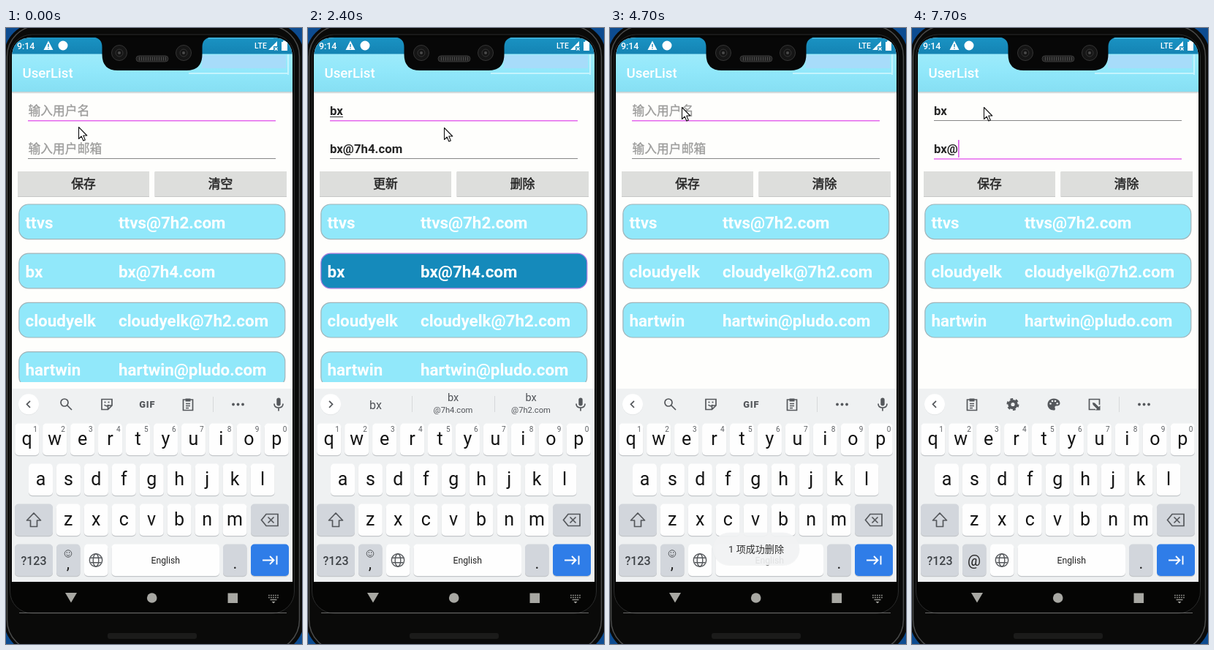
Write an HTML page that moves like this. It is 405 px wide and 842 px high and loops after 8000 ms.

```html
<!DOCTYPE html>
<html lang="zh-CN">
<head>
<meta charset="utf-8">
<title>UserList</title>
<style>
html, body { margin: 0; width: 100%; height: 100%; overflow: hidden; background: #050505; }
svg { display: block; width: 405px; height: 842px; }
text { font-family: Roboto, "Noto Sans CJK SC", "Noto Sans CJK", sans-serif; }
.hint { font-size: 16.8px; fill: #9c9c9b; stroke: #9c9c9b; stroke-width: .3; }
.value { font-size: 16.8px; font-weight: 700; fill: #262626; }
.btn { font-size: 16.8px; fill: #252525; stroke: #252525; stroke-width: .5; text-anchor: middle; }
.row { font-size: 22.4px; font-weight: 700; fill: #fff; }
.mid { text-anchor: middle; }
.letter { font-size: 25px; fill: #151515; text-anchor: middle; }
.caps .letter { text-transform: uppercase; }
.num { font-size: 10px; fill: #5c5f63; text-anchor: middle; }
.icon { fill: none; stroke: #55585c; stroke-width: 1.7; }
.thin { stroke-width: 1; }
.solid { fill: #55585c; stroke: none; }
.caret { fill: #dd62ea; }
.focus { stroke: #e467ee; stroke-width: 1.5; }
.blur { stroke: #878787; }
</style>
</head>
<body>
<svg viewBox="0 0 405 842" xmlns="http://www.w3.org/2000/svg">
  <defs>
    <linearGradient id="bar" x2="0" y2="1">
      <stop offset="0" stop-color="#9debfb"/><stop offset=".5" stop-color="#90e7fa"/><stop offset="1" stop-color="#86dff3"/>
    </linearGradient>
    <linearGradient id="status" x2="0" y2="1">
      <stop offset="0" stop-color="#1a93c3"/><stop offset="1" stop-color="#1483b3"/>
    </linearGradient>
    <linearGradient id="shade" x2="0" y2="1">
      <stop offset="0" stop-color="#b9c6c9"/><stop offset="1" stop-color="#fefefc"/>
    </linearGradient>
    <clipPath id="screen"><path d="M8 757V41Q8 13 36 13H364Q392 13 392 41V757Z"/></clipPath>
    <clipPath id="list"><path d="M8 232H392V484H8Z"/></clipPath>
    <g id="clip" class="icon">
      <path d="M-6.5 -6.5H6.5V8H-6.5Z M-3 -1H3 M-3 2H3 M-3 5H1"/>
      <path class="solid" d="M-3.5 -8H3.5V-4H-3.5Z"/>
    </g>
  </defs>

  <!-- phone body -->
  <path fill="#0d4c91" d="M0 0H405V842H0Z"/>
  <rect x="-3" y="-7" width="411" height="862" rx="46" fill="#0a0a09"/>
  <rect x="1.5" y="-3" width="400" height="854" rx="42" fill="none" stroke="#4a4b4b" stroke-width="1.5"/>
  <rect x="5.5" y="9" width="389" height="791" rx="30" fill="#050504" stroke="#2a2b2b"/>
  <path d="M18 799.5H384" stroke="#686867"/>
  <rect x="139" y="827" width="122" height="8" rx="3" fill="#1b1b1a"/>

  <g clip-path="url(#screen)">
    <path fill="#fefefc" d="M8 13H392V757H8Z"/>
    <path fill="url(#status)" d="M8 13H392V36H8Z"/>
    <path fill="url(#bar)" d="M8 35.5H392V87H8Z"/>
    <path fill="url(#shade)" d="M8 87H392V90H8Z"/>
    <path fill="#a7dcfa" d="M268 37H383V55H268Z"/>
    <path d="M276 14H366" stroke="#45b6de" stroke-width="1.5"/>
    <path d="M250 62H386M386 36V64" stroke="#c4f4fd" stroke-width="2" fill="none"/>
    <text x="15" y="29" font-size="12.4" font-weight="500" fill="#fff">9:14</text>
    <path fill="#fff" d="M58 17.5L64.5 30H51.5Z"/>
    <path stroke="#1787b8" stroke-width="1.4" d="M58 22V26M58 27.2V28.6"/>
    <circle cx="78" cy="24" r="6.5" fill="#fff"/>
    <text x="340" y="28" font-size="10.4" font-weight="500" fill="#fff">LTE</text>
    <path fill="#fff" d="M359 30L371 18V25H366V30Z"/>
    <path stroke="#fff" stroke-width="1.3" d="M367.5 26.5L371.5 30.5M371.5 26.5L367.5 30.5"/>
    <path fill="#fff" d="M377 19H379V17.5H383V19H385V31H377Z"/>
    <text x="22.5" y="68" font-size="18.7" font-weight="500" fill="#fff">UserList</text>

    <!-- name field -->
    <text class="hint" x="30.5" y="119.3" data-on="0-1400 3100-5200">输入用户名</text>
    <text class="value" x="30" y="119.3" data-on="1400-3100 5200-8000">bx</text>
    <path d="M30 121.5H48" stroke="#333" data-on="1500-3100 5400-5900"/>
    <path class="focus" d="M30 126.7H369" data-on="0-5900"/>
    <path class="blur" d="M30 126.5H369" data-on="5900-8000"/>
    <path class="caret" d="M30 102H31.7V125H30Z" data-on="200-700 1200-1900 2500-3000 3100-3700 4200-4700"/>
    <path class="caret" d="M48 102H49.7V125H48Z" data-on="5200-5900"/>

    <!-- mail field -->
    <text class="hint" x="30.5" y="170.8" data-on="0-1400 3100-6700">输入用户邮箱</text>
    <text class="value" x="30" y="171" data-on="1400-3100">bx@7h4.com</text>
    <text class="value" x="30" y="171" data-on="6700-6900">b</text>
    <text class="value" x="30" y="171" data-on="6900-7600">bx</text>
    <text class="value" x="30" y="171" data-on="7600-8000">bx@</text>
    <path d="M30 173.5H48" stroke="#333" data-on="6900-7600"/>
    <path class="blur" d="M30 178.5H369" data-on="0-5900"/>
    <path class="focus" d="M30 178.9H369" data-on="5900-8000"/>
    <path class="caret" d="M30 153H31.7V177H30Z" data-on="5900-6400"/>
    <path class="caret" d="M39 153H40.7V177H39Z" data-on="6700-6900"/>
    <path class="caret" d="M48 153H49.7V177H48Z" data-on="6900-7400"/>
    <path class="caret" d="M63 153H64.7V177H63Z" data-on="7600-8000"/>

    <!-- buttons -->
    <path fill="#c6c7c6" d="M16 197H196V231H16ZM203.5 197H384V231H203.5Z"/>
    <path fill="#dddedc" d="M16 196H196V230H16ZM203.5 196H384V230H203.5Z"/>
    <g id="press">
      <rect x="203" y="198" width="181.5" height="35" rx="2" fill="#d9d9d8"/>
      <rect x="203.5" y="196" width="180.5" height="34.5" rx="1" fill="#c2c2c1"/>
    </g>
    <text class="btn" x="106" y="219.3" data-on="0-1400 3100-8000">保存</text>
    <text class="btn" x="106" y="219.3" data-on="1400-3100">更新</text>
    <text class="btn" x="293.5" y="219.3" data-on="0-1400">清空</text>
    <text class="btn" x="293.5" y="219.3" data-on="1400-3100">删除</text>
    <text class="btn" x="293.5" y="219.3" data-on="3100-8000">清除</text>

    <g id="rows" clip-path="url(#list)"></g>

    <!-- keyboard -->
    <path fill="#eff1f2" d="M8 493H392V757H8Z"/>
    <circle cx="31" cy="515" r="14" fill="#dfe1e3"/>
    <circle cx="31" cy="514.3" r="14" fill="#fff"/>
    <g data-on="0-1500 3400-5400 6400-6900 7600-8000">
      <path class="icon" d="M33 509.8L28.5 514.3L33 518.8"/>
      <path stroke="#d6d8da" d="M283.5 504V525"/>
      <g class="solid"><circle cx="311" cy="514.5" r="1.9"/><circle cx="317.5" cy="514.5" r="1.9"/><circle cx="324" cy="514.5" r="1.9"/></g>
    </g>
    <g data-on="0-1500 3400-5400">
      <g class="icon">
        <circle cx="80" cy="512" r="5"/><path d="M83.5 515.5L90 522"/>
        <path d="M131 507.5H145V516L139.5 521.5H131ZM145 516H139.5V521.5M134.5 515Q137.5 518 140.5 515"/>
      </g>
      <g class="solid"><circle cx="135.5" cy="511.5" r="1.1"/><circle cx="140.5" cy="511.5" r="1.1"/></g>
      <text class="mid" x="193.3" y="518.5" font-size="12.8" font-weight="900" letter-spacing=".8" fill="#55585c">GIF</text>
      <use href="#clip" x="249" y="514.5"/>
    </g>
    <g data-on="6400-6900 7600-8000">
      <use href="#clip" x="82" y="514.5"/>
      <circle class="icon" cx="138" cy="514.5" r="4.6" style="stroke-width:4"/>
      <circle class="icon" cx="138" cy="514.5" r="7.3" style="stroke-width:2.4" stroke-dasharray="3.82"/>
      <path class="solid" d="M194 506.5C189 506.5 185.5 510 185.5 514.5S189 522.5 194 522.5C196.5 522.5 196 520 195.5 519C195 517.5 196 516.5 198 516.5C201 516.5 202.5 515 202.5 513C202.5 509 198.5 506.5 194 506.5Z"/>
      <g fill="#eff1f2"><circle cx="189.5" cy="513.5" r="1.3"/><circle cx="192" cy="510" r="1.3"/><circle cx="196" cy="510" r="1.3"/><circle cx="198.8" cy="513.2" r="1.3"/></g>
      <path class="icon" d="M251 521.5H242.5V507.5H256.5V515"/>
      <path class="solid" d="M247 512L250 512.5L255.5 518L257.5 516V522.5H251L253 520.5L247.5 515Z"/>
    </g>
    <g data-on="1500-3400 5400-6400 6900-7600">
      <path class="icon" d="M29 509.8L33.5 514.3L29 518.8"/>
      <path stroke="#d6d8da" d="M142.5 503V525M255.5 503V525"/>
      <g class="mid" fill="#505358">
        <text x="92.5" y="520.5" font-size="16">bx</text>
        <text x="198.5" y="509.8" font-size="14.5">bx</text>
        <text x="198.5" y="525.5" font-size="11.2">@7h4.com</text>
        <text x="305" y="509.8" font-size="14.5">bx</text>
        <text x="305" y="525.5" font-size="11.2">@7h2.com</text>
      </g>
    </g>
    <g data-on="0-6400">
      <rect class="solid" x="370.3" y="505.5" width="5.4" height="11" rx="2.7"/>
      <path class="icon" d="M367 513.5Q367 519 373 519T379 513.5M373 519V523.5"/>
    </g>
    <g id="keys"></g>
    <g class="icon">
      <path id="shift" d="M38 663L47.5 673H42.5V681.5H33.5V673H28.5Z" stroke-linejoin="round"/>
      <path d="M356 664.5H372V680.5H356L349.5 672.5ZM358.5 668.5L366.5 676.5M366.5 668.5L358.5 676.5"/>
      <g style="stroke-width:1.4">
        <circle cx="123" cy="727.5" r="8.7"/>
        <ellipse cx="123" cy="727.5" rx="3.8" ry="8.7"/>
        <path d="M115.5 724.3H130.5M115.5 730.7H130.5"/>
      </g>
    </g>
    <text class="mid" x="38" y="733.5" font-size="16" font-weight="500" fill="#3f4347">?123</text>
    <g data-on="0-6400">
      <text class="mid" x="85" y="738.5" font-size="22" fill="#222">,</text>
      <circle class="icon thin" cx="85" cy="718.5" r="4.8"/>
      <path class="icon thin" d="M82.5 720Q85 722.8 87.5 720M83.3 716V718M86.7 716V718"/>
    </g>
    <text class="mid" x="85" y="734.5" font-size="20" fill="#222" data-on="6400-8000">@</text>
    <text class="mid" x="218.3" y="732" font-size="12.2" fill="#222">English</text>
    <text class="mid" x="313.5" y="738.5" font-size="22" fill="#222">.</text>
    <path d="M351 727.5H366M361 722L366.5 727.5L361 733M370.5 721.5V733.5" fill="none" stroke="#fff" stroke-width="1.9"/>
    <g id="toast">
      <rect x="140.5" y="690" width="119" height="45" rx="22.5" fill="#e3e5e6" opacity=".4"/>
      <rect x="141" y="689.5" width="118" height="44.5" rx="22" fill="#f3f4f5" opacity=".86"/>
      <text class="mid" x="200" y="717" font-size="13.07" fill="#2f2f2f">1 项成功删除</text>
    </g>
  </g>

  <!-- notch -->
  <path fill="#070707" d="M118 12.5Q131.500 13 131.500 26V36Q131.500 58 153 58H247Q268.500 58 268.500 36V26Q268.500 13 282 12.5Z"/>
  <g fill="#151515" stroke="#343434">
    <circle cx="155" cy="34" r="10.5"/><circle cx="243" cy="34" r="10.5"/>
    <circle cx="155" cy="34" r="5"/><circle cx="243" cy="34" r="5"/>
  </g>
  <circle cx="155" cy="34" r="2" fill="#4a4a4a"/><circle cx="243" cy="34" r="2" fill="#4a4a4a"/>
  <rect x="178" y="38" width="44" height="8" rx="4" fill="#222" stroke="#3a3a3a"/>
  <path d="M182 42H219" stroke="#4b4b4b" stroke-width="5" stroke-dasharray="1 2"/>

  <!-- navigation bar -->
  <g fill="#a8a8a3">
    <path d="M81 772H97L89 785.5Z"/><circle cx="199.7" cy="779" r="6.8"/><path d="M303.5 772.5H317V786H303.5Z"/>
    <path d="M363.5 784H368.5L366 786.5Z"/>
  </g>
  <path d="M359 775.5H373M359 778.5H373" stroke="#8f8f8b" stroke-width="1.7" stroke-dasharray="1.8 1.2"/>
  <path d="M361.500 781.500H370.500" stroke="#8f8f8b" stroke-width="1.5"/>

  <path id="pointer" d="M.5 .5V16.5L4.2 13L6.8 19L9.3 17.9L6.8 12H11.8Z" fill="#fff" stroke="#111" stroke-width="1.1" stroke-linejoin="round"/>
</svg>
<script>
const LOOP = 8000, STEP = 100;
const $ = id => document.getElementById(id);

const users = [
  ['ttvs', 'ttvs@7h2.com'],
  ['bx', 'bx@7h4.com'],
  ['cloudyelk', 'cloudyelk@7h2.com'],
  ['hartwin', 'hartwin@pludo.com']
];

function row([name, mail], i, on, picked) {
  const y = 241 + i * 67.2;
  const [fill, edge] = picked ? ['#158abb', '#a478dc'] : ['#91e8fa', '#a0b3b8'];
  return `<g data-on="${on}">
    <rect x="17.8" y="${y}" width="364" height="47.6" rx="13" fill="${fill}" stroke="${edge}" stroke-width="1.2"/>
    <text class="row" x="26.5" y="${y + 32.7}">${name}</text>
    <text class="row" x="154" y="${y + 32.7}">${mail}</text></g>`;
}

const rest = users.filter((u, i) => i !== 1);
$('rows').innerHTML =
  row(users[0], 0, '0-3300') +
  row(users[1], 1, '0-1400') +
  row(users[1], 1, '1400-3300', true) +
  row(users[2], 2, '0-3300') +
  row(users[3], 3, '0-3300') +
  rest.map((u, i) => row(u, i, '3300-8000')).join('');

const key = (x, y, w, fill = '#fefefe') =>
  `<rect x="${x}" y="${y + 1.2}" width="${w}" height="43.5" rx="5" fill="#c3c6c9"/>
   <rect x="${x}" y="${y}" width="${w}" height="43.5" rx="5" fill="${fill}"/>`;

const letters = (chars, first, y) => [...chars].map((c, i) => {
  const x = first + i * 37.95;
  return key(x - 16.5, y, 33) + `<text class="letter" x="${x}" y="${y + 29.5}">${c}</text>`;
}).join('');

const gray = '#d2d6dc';
$('keys').innerHTML =
  letters('qwertyuiop', 28.7, 540.5) + letters('asdfghjkl', 47.5, 595.5) + letters('zxcvbnm', 85.3, 650.5) +
  [...'1234567890'].map((n, i) => `<text class="num" x="${40 + i * 37.95}" y="551.5">${n}</text>`).join('') +
  key(12, 650.5, 52, gray) + key(335, 650.5, 52, gray) +
  key(12, 705.5, 52, gray) + key(69, 705.5, 32.5, gray) + key(107, 705.5, 32.5) +
  key(144.5, 705.5, 147.5) + key(297, 705.5, 32.5, gray) + key(335, 705.5, 52, '#2f7de8');

// time, x, y
const path = [
  [0, 99, 135], [400, 205, 270], [500, 205, 270], [1200, 194, 339], [1400, 194, 339],
  [1600, 187, 329], [1700, 187, 329], [2000, 186, 65], [2100, 186, 65], [2400, 186, 136],
  [2800, 298, 219], [3000, 297, 203], [3200, 297, 203], [3800, 98, 108], [LOOP, 98, 108]
];

function pointerAt(t) {
  const i = path.findIndex(p => p[0] > t);
  const [a, b] = [path[i - 1], path[i]];
  const k = (t - a[0]) / (b[0] - a[0]);
  return [a[1] + (b[1] - a[1]) * k, a[2] + (b[2] - a[2]) * k];
}

const ramp = (t, from, to) => Math.min(1, Math.max(0, (t - from) / (to - from)));

const timed = [...document.querySelectorAll('[data-on]')].map(el => ({
  el, spans: el.dataset.on.split(' ').map(s => s.split('-').map(Number))
}));

function draw(time) {
  const t = Math.floor(time / STEP) * STEP;
  for (const { el, spans } of timed)
    el.style.visibility = spans.some(([a, b]) => t >= a && t < b) ? 'visible' : 'hidden';
  const caps = t >= 7400 && t < 7700;
  $('keys').classList.toggle('caps', caps);
  $('shift').style.fill = caps ? '#55585c' : 'none';
  $('press').style.opacity = t < 3100 ? 0 : 1 - ramp(t, 3300, 3700);
  $('toast').style.opacity = ramp(t, 3300, 3700) * (1 - ramp(t, 6600, 7100));
  const [x, y] = pointerAt(t);
  $('pointer').setAttribute('transform', `translate(${x} ${y})`);
}

let start;
function tick(now) {
  start ??= now;
  draw((now - start) % LOOP);
  requestAnimationFrame(tick);
}
draw(0);
requestAnimationFrame(tick);
</script>
</body>
</html>
```
